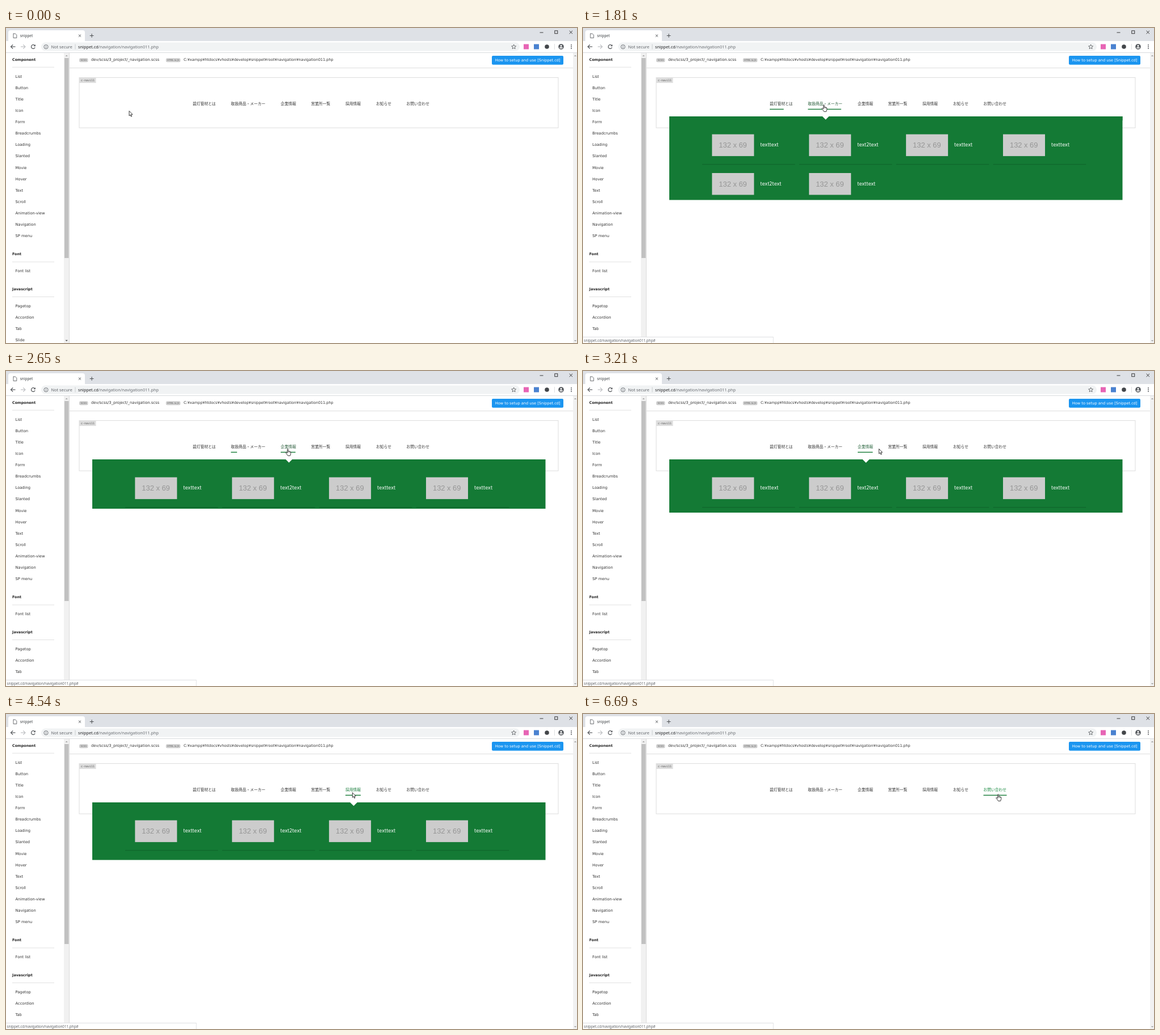
An HTML page with a canvas for the animation above (7.15 s loop, 1006 px wide and 556 px high).

```html
<!DOCTYPE html>
<html lang="ja">
<head>
<meta charset="utf-8">
<title>snippet</title>
<style>
html, body { margin: 0; width: 100%; height: 100%; overflow: hidden; background: #fff; }
canvas { display: block; }
</style>
</head>
<body>
<canvas id="stage" width="1006" height="556"></canvas>
<script>
const ctx = document.getElementById('stage').getContext('2d');
const LOOP = 7150, FADE = 300;
const UI = '"Noto Sans", "Open Sans", sans-serif';
const PAGE = '"DejaVu Sans", sans-serif';
const JP = '"Noto Sans CJK JP", "Noto Sans CJK", sans-serif';
const GREEN = '#147a35';

// Menu entries: position, underline width, hover start and end, panel cells
const menu = [
  { label: '碧灯管材とは', x: 329, w: 41, on: 790, off: 1590, cells: 3 },
  { label: '取扱商品・メーカー', x: 396.3, w: 60.5, on: 1607, off: 2370, cells: 6 },
  { label: '企業情報', x: 484, w: 27, on: 2450, off: 3130, cells: 4 },
  { label: '営業所一覧', x: 537.5, w: 34, on: 3240, off: 3860, cells: 4 },
  { label: '採用情報', x: 598, w: 27, on: 3974, off: 4520, cells: 4 },
  { label: 'お知らせ', x: 652, w: 27, on: 5130, off: 5650, cells: 0 },
  { label: 'お問い合わせ', x: 705.5, w: 41, on: 5680, off: LOOP, cells: 0 }
];

// Pointer moves: start, end, target x, target y
const moves = [
  [430, 870, 346, 137], [1570, 1800, 421, 135], [2330, 2570, 493, 137],
  [3050, 3380, 552, 137], [3850, 4070, 600, 138], [4460, 4700, 639, 139],
  [5000, 5290, 668, 133], [5630, 5860, 727, 140], [6610, 6690, 728, 141]
];

const clamp = v => Math.max(0, Math.min(1, v));
const smooth = u => u * u * (3 - 2 * u);
const inOut = u => u < .5 ? 4 * u ** 3 : 1 - 4 * (1 - u) ** 3;
const out = u => 1 - (1 - u) ** 3;

function rect(x, y, w, h, color) {
  ctx.fillStyle = color;
  ctx.fillRect(x, y, w, h);
}
function pill(x, y, w, h, r, color) {
  ctx.fillStyle = color;
  ctx.beginPath();
  ctx.roundRect(x, y, w, h, r);
  ctx.fill();
}
function text(str, x, y, size, color, family = PAGE, weight = 400) {
  ctx.font = `${weight} ${size}px ${family}`;
  ctx.fillStyle = color;
  ctx.fillText(str, x, y);
}
function path(points, color, width, fill) {
  ctx.beginPath();
  for (let i = 0; i < points.length; i += 2) ctx.lineTo(points[i], points[i + 1]);
  if (fill) {
    ctx.closePath();
    ctx.fillStyle = fill;
    ctx.fill();
  }
  if (color) {
    ctx.strokeStyle = color;
    ctx.lineWidth = width;
    ctx.stroke();
  }
}
function arc(x, y, r, color, width, from = 0, to = Math.PI * 2) {
  ctx.beginPath();
  ctx.arc(x, y, r, from, to);
  ctx.strokeStyle = color;
  ctx.lineWidth = width;
  ctx.stroke();
}
function dot(x, y, r, color) {
  ctx.beginPath();
  ctx.arc(x, y, r, 0, Math.PI * 2);
  ctx.fillStyle = color;
  ctx.fill();
}
function cross(x, y, r, color) {
  path([x - r, y - r, x + r, y + r], color, .9);
  path([x + r, y - r, x - r, y + r], color, .9);
}
function caret(x, y, dir, color) {
  path([x - 2.2, y + dir, x + 2.2, y + dir, x, y - dir * 1.3], null, 0, color);
}

function drawBrowser() {
  const ink = '#4a4d51';
  rect(0, 0, 1006, 24, '#dee1e6');
  pill(4, 4, 135, 24, 4, '#fff');
  rect(0, 23, 1006, 20, '#fff');
  path([13, 10, 16.5, 10, 18.8, 12.3, 18.8, 17.5, 13, 17.5, 13, 9.6], ink, .8);
  text('snippet', 24.8, 16, 6.4, '#3c4043', UI);
  cross(130, 13.6, 2.1, ink);
  path([147.7, 13.5, 154.5, 13.5], ink, 1);
  path([151.1, 10.1, 151.1, 16.9], ink, 1);
  path([940.5, 8, 946.5, 8], '#222', .9);
  ctx.strokeRect(966.8, 4.8, 5, 5);
  cross(995.3, 7.5, 2.7, '#222');

  for (const [x, dir, color] of [[12.5, 1, ink], [30, -1, '#b9bbbe']]) {
    path([x - 4 * dir, 33, x + 4 * dir, 33], color, 1.1);
    path([x - .3 * dir, 29.3, x - 4 * dir, 33, x - .3 * dir, 36.7], color, 1.1);
  }
  arc(48, 33, 3.4, ink, 1.1, .4, 5.5);
  path([51.8, 29, 51.8, 32.2, 48.6, 32.2], null, 0, ink);

  pill(62, 25.5, 843, 15, 7.5, '#f1f3f4');
  arc(70.5, 33.2, 3.6, '#5f6368', .9);
  path([70.5, 32.6, 70.5, 35.2], '#5f6368', .9);
  path([70.5, 31, 70.5, 31.9], '#5f6368', .9);
  text('Not secure', 79.5, 35.8, 7.35, '#5f6368', UI);
  path([122, 28.5, 122, 37.5], '#c0c3c7', .8);
  text('snippet.cd', 127, 35.8, 7.33, '#202124', UI);
  const host = ctx.measureText('snippet.cd').width;
  text('/navigation/navigation011.php', 127 + host, 35.8, 7.33, '#6b6f74', UI);

  const star = [];
  for (let i = 0; i <= 10; i++) {
    const a = -Math.PI / 2 + i * Math.PI / 5, r = i % 2 ? 1.9 : 4.2;
    star.push(894.6 + r * Math.cos(a), 33.3 + r * Math.sin(a));
  }
  path(star, ink, .8);
  rect(912, 28.5, 9, 9, '#e765b5');
  rect(930, 28.5, 9, 9, '#4a82d0');
  dot(953, 33, 3.8, '#43464a');
  path([966.5, 28, 966.5, 38], '#d5d7da', .8);
  dot(978, 33, 4.8, '#54585d');
  dot(978, 31.6, 1.6, '#fff');
  pill(975.2, 34.1, 5.6, 2, 1, '#fff');
  for (const y of [30, 33, 36]) dot(996, y, .9, ink);
  rect(0, 43, 1006, 1, '#d9dbde');
}

function drawSidebar() {
  const list = (names, y) => names.forEach((n, i) => text(n, 16.5, y + i * 20.14, 6.72, '#333'));
  const group = (name, y) => {
    text(name, 11, y, 6.4, '#222', PAGE, 700);
    rect(11, y + 11, 74, 1, '#e1e1e1');
  };
  group('Component', 57.7);
  list(['List', 'Button', 'Title', 'Icon', 'Form', 'Breadcrumbs', 'Loading', 'Slanted', 'Movie',
    'Hover', 'Text', 'Scroll', 'Animation-view', 'Navigation', 'SP menu'], 87.5);
  group('Font', 401.4);
  list(['Font list'], 431.2);
  group('Javascript', 463);
  list(['Pagetop', 'Accordion', 'Tab', 'Slide'], 492.8);

  rect(102, 44, 9.5, 512, '#f1f1f1');
  rect(103, 53, 7.5, 353, '#c1c1c1');
  rect(111, 44, 1, 512, '#dcdcdc');
  caret(106.7, 49, 1, '#a3a3a3');
  caret(106.7, 551.7, -1, '#505050');
  rect(999, 44, 7, 512, '#f1f1f1');
  caret(1003, 49, 1, '#a3a3a3');
  caret(1003, 552, -1, '#a3a3a3');
}

function drawHeader() {
  pill(129, 53.3, 15.5, 7, 2.5, '#cfcfcf');
  text('SCSS', 131.4, 58.4, 4.1, '#666');
  text('dev/scss/3_project/_navigation.scss', 150, 57.8, 6.75, '#333');
  pill(281.8, 53.3, 25.5, 7, 2.5, '#cfcfcf');
  text('HTML & JS', 284, 58.4, 4.1, '#666');
  text('C:¥xampp¥htdocs¥vhosts¥develop¥snippet¥root¥navigation¥navigation011.php', 313, 57.8, 6.5, '#333');
  pill(856, 49, 126, 15.7, 2, '#1b95f0');
  text('How to setup and use [Snippet.cd]', 861.8, 59.3, 6.64, '#fff');
  rect(112, 70, 887, 1, '#dedede');

  ctx.strokeStyle = '#ddd';
  ctx.lineWidth = 1;
  ctx.strokeRect(129, 87.5, 844, 88.7);
  rect(129, 87.3, 29.5, 9.7, '#dedede');
  text('c-navi11', 132, 94, 5, '#555', '"DejaVu Sans Mono", monospace');
}

// Hover amount, 0 to 1, rising after on and falling after off
function hover(item, t) {
  return clamp((t - item.on) / FADE) * (1 - clamp((t - item.off) / FADE));
}

function drawPanel(item, u) {
  const p = inOut(u), rows = Math.ceil(item.cells / 4);
  const height = (34 + 68 * rows) * p;
  ctx.save();
  ctx.beginPath();
  ctx.rect(152, 156, 798.5, height);
  ctx.clip();
  rect(152, 156, 799, height, GREEN);
  for (let i = 0; i < item.cells; i++) {
    const x = 227.3 + i % 4 * 170.9, y = 187.6 + Math.floor(i / 4) * 68.4;
    rect(x, y, 74, 38.5, '#ccc');
    text('132 x 69', x + 12, y + 23.8, 12.9, '#969696', '"Liberation Sans", Arial, sans-serif');
    text(i % 4 === 1 || i === 4 ? (i === 5 ? 'texttext' : 'text2text') : 'texttext', x + 85, y + 21.8, 8.15, '#fff');
    rect(x - 17.3, y + 52.4, 163.5, 1.3, '#0f672b');
  }
  const d = 6.3 * p ** .7, cx = item.x + item.w / 2 + 1;
  path([cx - d, 156, cx + d, 156, cx, 156 + d], null, 0, '#fff');
  ctx.restore();
}

function drawMenu(t) {
  for (const item of menu) {
    const u = hover(item, t), k = u * u;
    const mix = (a, b) => Math.round(a + (b - a) * k);
    text(item.label, item.x, 135.5, 6.75, `rgb(${mix(51, 20)},${mix(51, 135)},${mix(51, 60)})`, JP);
    if (u > 0) rect(item.x, 142.7, item.w * out(u), 1.4, GREEN);
  }
  for (const item of menu) {
    const u = hover(item, t);
    if (item.cells && u > 0) drawPanel(item, u);
  }
}

function drawStatus(t) {
  if (t < 1200 || (t > 5040 && t < 5420)) return;
  rect(0, 545, 335.5, 11, '#d5d7da');
  rect(0, 545.8, 334.8, 10.2, '#fff');
  text('snippet.cd/navigation/navigation011.php#', 1.5, 553.7, 6.3, '#5f6368', UI);
}

function drawPointer(t) {
  let x = 217, y = 146;
  for (const [from, to, tx, ty] of moves) {
    const u = smooth(clamp((t - from) / (to - from)));
    x += (tx - x) * u;
    y += (ty - y) * u;
  }
  const onLink = menu.some(m => t >= m.on && t < m.off);
  ctx.save();
  ctx.translate(x, y);
  ctx.lineJoin = 'round';
  if (onLink) {
    path([2.6, 7.5, 2.6, 1.2, 3.3, .5, 4.2, 1.2, 4.2, 4.6, 5.8, 4.7, 7.3, 5.2, 8.6, 5.8, 8.8, 8.6,
      7.6, 12.6, 3.6, 12.6, 1.8, 9.9, -.3, 7.3, .3, 6.5, 1.3, 6.7, 2.6, 8.1], '#222', .9, '#fff');
    path([4.2, 4.6, 4.2, 6.8], '#222', .6);
    path([5.8, 4.8, 5.8, 6.8], '#222', .6);
    path([7.3, 5.3, 7.3, 7], '#222', .6);
  } else {
    path([0, .4, 0, 9, 2, 7.2, 3.4, 10.4, 4.7, 9.8, 3.4, 6.8, 6, 6.6, 0, .4], '#222', .9, '#fff');
  }
  ctx.restore();
}

function frame(now) {
  const t = now % LOOP;
  rect(0, 0, 1006, 556, '#fff');
  drawBrowser();
  drawSidebar();
  drawHeader();
  drawMenu(t);
  drawStatus(t);
  drawPointer(t);
}

const start = performance.now();
function tick() {
  frame(performance.now() - start);
  requestAnimationFrame(tick);
}
tick();
</script>
</body>
</html>
```
